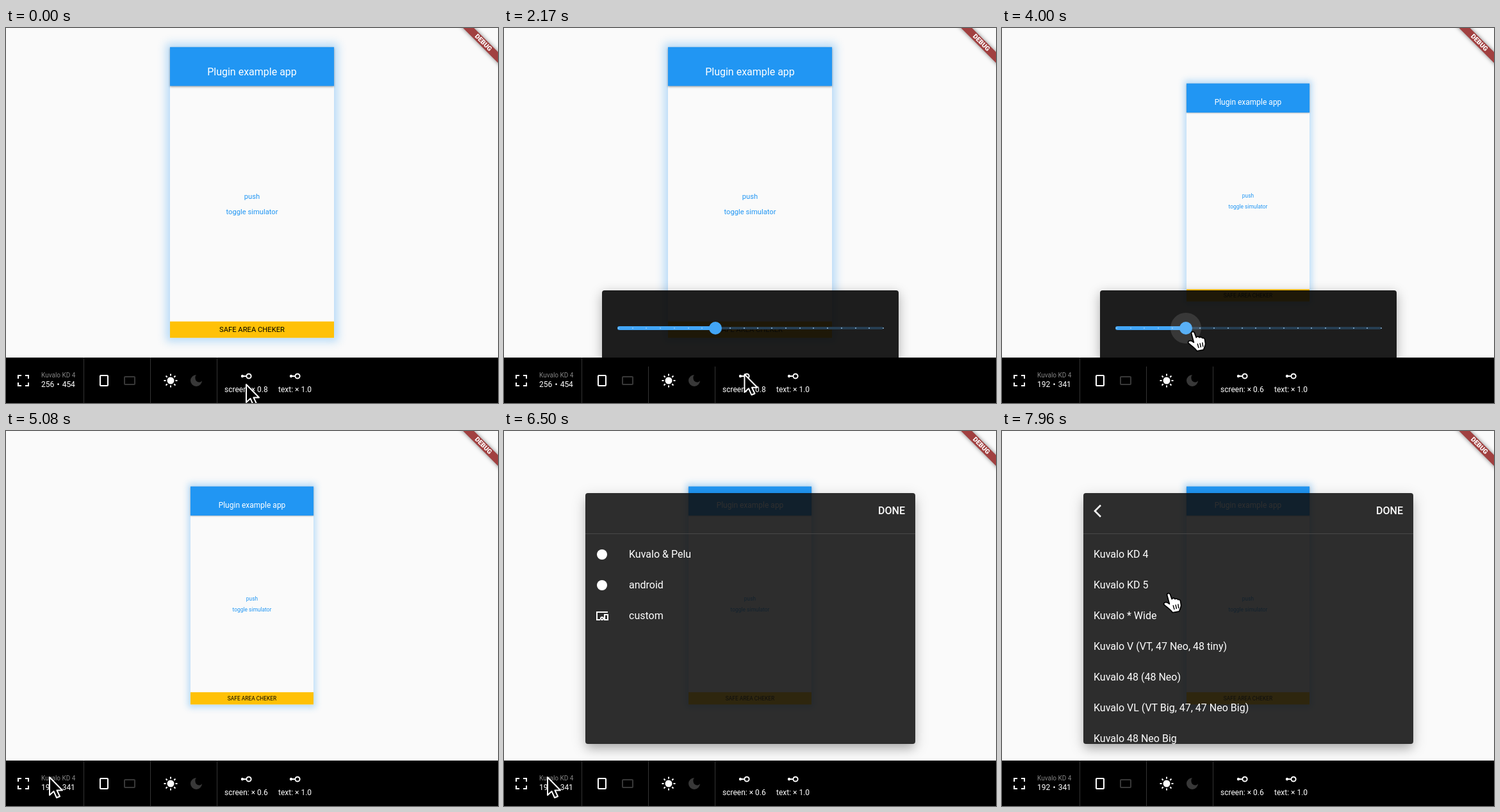
These frames come from a looping animation (768 px wide and 586 px high, 8000 ms). An HTML page:

```html
<!DOCTYPE html>
<html lang="en">
<head>
<meta charset="utf-8">
<title>Device simulator</title>
<style>
  html, body { margin: 0; width: 100%; height: 100%; overflow: hidden; }
  #stage {
    --page: #fafafa; --blue: #2196f3; --accent: #42a5f5; --dim: #383838;
    position: absolute; inset: 0; width: 768px; height: 586px; overflow: hidden;
    background: var(--page); color: #fff; font: 16px/20px Roboto, sans-serif;
  }
  #stage div, #stage span, #stage svg { position: absolute; }
  span { white-space: pre; margin-top: -10px; }
  .mid { left: 0; width: 100%; text-align: center; }

  #phone {
    left: 224px; top: -27px; width: 320px; height: 568px; background: var(--page);
    box-shadow: 0 0 16px 7px rgba(33, 150, 243, .3);
  }
  #appbar {
    width: 320px; height: 76px; background: var(--blue);
    box-shadow: 0 2px 4px rgba(0, 0, 0, .35);
  }
  #phone .link { color: var(--blue); font-size: 14px; }
  #safe { bottom: 0; width: 320px; height: 32px; background: #ffc107; color: #000; font-size: 14px; }

  #banner {
    left: 685.4px; top: 16.6px; width: 120px; height: 12px; transform: rotate(45deg);
    background: #a14040; box-shadow: 0 0 6px rgba(0, 0, 0, .5);
    font: 900 10.2px/12px Roboto, sans-serif; text-align: center;
  }

  #bar { left: 0; top: 515px; width: 768px; height: 71px; background: #000; font-size: 12px; }
  #bar i { position: absolute; top: 0; width: 1px; height: 71px; background: #333; }
  #icons { left: 0; top: 0; }

  #panel {
    left: 153px; top: 410px; width: 463px; height: 105px; border-radius: 4px 4px 0 0;
    background: rgba(8, 8, 8, .91);
    box-shadow: 0 5px 18px 1px rgba(0, 0, 0, .28);
    clip-path: inset(-30px -30px -14px -30px);
  }
  #panel::after { content: ""; position: absolute; left: -30px; top: 105px; width: 523px; height: 14px; background: #000; }
  #rail { left: 25px; top: 57px; width: 414px; height: 4px; border-radius: 2px; background: #263e52; }
  #fill { left: 24px; top: 56px; height: 6px; border-radius: 3px; background: var(--accent); }
  #ticks {
    left: 24.5px; top: 58px; width: 415px; height: 2px; opacity: .6;
    background: repeating-linear-gradient(90deg, #a5d2f8 0 2px, transparent 2px 21.737px);
  }
  #thumb { top: 49px; width: 20px; height: 20px; margin-left: -10px; border-radius: 50%; background: var(--accent); }
  #halo { left: -14px; top: -14px; width: 48px; height: 48px; border-radius: 50%; background: rgba(255, 255, 255, .12); }

  #dialog {
    left: 127px; top: 97px; width: 515px; height: 392px; border-radius: 4px;
    background: rgba(16, 16, 16, .87);
    box-shadow: 0 9px 15px -3px rgba(0, 0, 0, .22), 0 6px 22px 2px rgba(0, 0, 0, .14);
  }
  #dialog .page { inset: 0; overflow: hidden; }
  #rule { top: 63px; width: 515px; height: 1px; background: #484848; }
  #done { right: 16px; top: 28px; font-weight: 500; }
  #cursor { left: 0; top: 0; overflow: visible; stroke-linejoin: round; }
</style>
</head>
<body>
<div id="stage">
  <div id="phone">
    <div id="appbar"><span class="mid" style="top:48px;font-size:20px">Plugin example app</span></div>
    <span class="mid link" style="top:292px">push</span>
    <span class="mid link" style="top:321px">toggle simulator</span>
    <div id="safe"><span class="mid" style="top:16px">SAFE AREA CHEKER</span></div>
  </div>

  <div id="bar">
    <i style="left:121px"></i><i style="left:225px"></i><i style="left:329px"></i>
    <span style="left:55px;top:28px;font-size:10px;color:#858585">Kuvalo KD 4</span>
    <span id="size" style="left:55px;top:42px;word-spacing:1.2px"></span>
    <span id="zoom" style="left:341px;top:50px"></span>
    <span style="left:425px;top:50px">text: × 1.0</span>
    <svg id="icons" width="768" height="71" fill="none" stroke="#fff" stroke-width="2">
      <defs>
        <g id="knob">
          <circle cx="369" cy="29" r="2.2" fill="#fff" stroke="none"/>
          <path d="M368 29h7"/><circle cx="379" cy="29" r="3.6"/>
        </g>
      </defs>
      <path d="M19 33V28H24M30 28H35V33M35 39V44H30M24 44H19V39"/>
      <rect x="147" y="28" width="12" height="16" rx="1"/>
      <rect x="185" y="30" width="16" height="12" rx="1" stroke="#383838"/>
      <circle cx="257" cy="36" r="5.5" fill="#fff" stroke="none"/>
      <g id="rays"></g>
      <path d="M297 27a9 9 0 1 0 9 9c-3 4-8 3-10-1-1-3-1-6 1-8z" fill="#383838" stroke="none"/>
      <use id="zoomKnob" href="#knob"/>
      <use href="#knob" x="76"/>
    </svg>
  </div>

  <div id="panel">
    <div id="rail"></div><div id="fill"></div><div id="ticks"></div>
    <div id="thumb"><div id="halo"></div></div>
  </div>

  <div id="dialog">
    <div id="rule"></div>
    <span id="done">DONE</span>
    <div class="page" id="brands">
      <svg width="60" height="220" fill="none" stroke="#fff" stroke-width="2">
        <g fill="#fff" stroke="none"><circle cx="26" cy="96" r="8"/><circle cx="26" cy="144" r="8"/></g>
        <path d="M35 186H18V198H23"/>
        <rect x="30" y="190" width="5" height="8"/><circle cx="26" cy="196" r="2"/>
      </svg>
    </div>
    <div class="page" id="models">
      <svg width="40" height="50" fill="none" stroke="#fff" stroke-width="2.6"><path d="M27 19L18 28L27 37"/></svg>
    </div>
  </div>

  <div id="banner">DEBUG</div>

  <svg id="cursor" width="1" height="1">
    <path id="arrow" d="M0 0V28L6.5 22L11 32L16 30L11.5 20.5H20Z" fill="#000" stroke="#fff" stroke-width="2"/>
    <g id="hand" stroke="#000" transform="translate(-.5 0) scale(.96)">
      <path d="M-1 2C-1-1 3-1 4 1L7 9C8 7 11 7 12 9C13 8 16 8 17 10C19 9 21 11 21 13L22 19C22 23 20 24 19 29L8 31C6 27 0 23-6 18C-7 15-3 13 0 15L3 17Z" fill="#fff" stroke-width="1.8"/>
      <path d="M9 19l2 7M13 18l1.5 7M17 17l1 7" stroke-width="1.5"/>
    </g>
  </svg>
</div>

<script>
const LOOP = 8000;
const $ = id => document.getElementById(id);

// time, x, y of the pointer tip
const POINTER = [
  [0, 375, 557], [750, 379, 546], [2080, 379, 546], [2650, 327, 477], [3180, 327, 477],
  [3720, 297, 475], [4200, 297, 475], [5000, 68, 541], [6500, 68, 541],
  [7000, 245, 213], [7420, 245, 213], [7850, 259, 254], [8000, 259, 254]
];
// time, zoom in tenths
const ZOOM = [[0, 8], [3330, 7], [3690, 6]];

const clamp = v => Math.min(1, Math.max(0, v));
const ease = p => p * p * (3 - 2 * p);
const ramp = (t, start, length) => ease(clamp((t - start) / length));
const within = (t, a, b) => t >= a && t < b;

function pointerAt(t) {
  const i = POINTER.findIndex((key, n) => n && t <= key[0]);
  const [t0, x0, y0] = POINTER[i - 1], [t1, x1, y1] = POINTER[i];
  const p = ease((t - t0) / (t1 - t0));
  return [x0 + (x1 - x0) * p, y0 + (y1 - y0) * p];
}

function addRows(page, left, rows) {
  rows.forEach((text, i) => {
    const row = document.createElement('span');
    row.textContent = text;
    row.style.cssText = `left:${left}px;top:${96 + 48 * i}px`;
    page.append(row);
  });
}

addRows($('brands'), 68, ['Kuvalo & Pelu', 'android', 'custom']);
addRows($('models'), 16, [
  'Kuvalo KD 4', 'Kuvalo KD 5', 'Kuvalo * Wide', 'Kuvalo V (VT, 47 Neo, 48 tiny)',
  'Kuvalo 48 (48 Neo)', 'Kuvalo VL (VT Big, 47, 47 Neo Big)', 'Kuvalo 48 Neo Big'
]);
$('rays').innerHTML = Array.from({ length: 8 }, (_, i) =>
  `<path d="M257 25.5v3" transform="rotate(${i * 45} 257 36)"/>`).join('');

function show(id, opacity) {
  $(id).style.opacity = opacity;
  $(id).style.visibility = opacity > 0 ? 'visible' : 'hidden';
}

function draw(t) {
  const tenths = ZOOM.filter(key => key[0] <= t).pop()[1];
  $('phone').style.transform = `scale(${tenths / 10})`;
  $('size').textContent = `${32 * tenths} • ${Math.round(56.8 * tenths)}`;
  $('zoom').textContent = `screen: × 0.${tenths}`;
  $('zoomKnob').style.opacity = within(t, 1560, 1760) ? .4 : 1;

  show('panel', ramp(t, 1780, 200) - ramp(t, 4850, 180));
  const slid = 8 - ramp(t, ZOOM[1][0], 75) - ramp(t, ZOOM[2][0], 75);
  const x = 25 + (slid - 1) * 413 / 19;
  $('thumb').style.left = x + 'px';
  $('fill').style.width = x - 24 + 'px';
  $('halo').style.opacity = ramp(t, 2550, 120) - ramp(t, 4250, 150);

  const opened = ramp(t, 5960, 200);
  const turn = ramp(t, 7430, 260);
  show('dialog', opened);
  show('brands', opened && clamp(1 - 2 * turn));
  show('models', clamp(2 * turn - 1));

  const [px, py] = pointerAt(t);
  $('cursor').style.transform = `translate(${px}px, ${py}px)`;
  const pointing = within(t, 2340, 4480) || t >= 6720;
  $('hand').style.display = pointing ? '' : 'none';
  $('arrow').style.display = pointing ? 'none' : '';
}

const start = performance.now();
(function frame() {
  draw((performance.now() - start) % LOOP);
  requestAnimationFrame(frame);
})();
</script>
</body>
</html>
```
